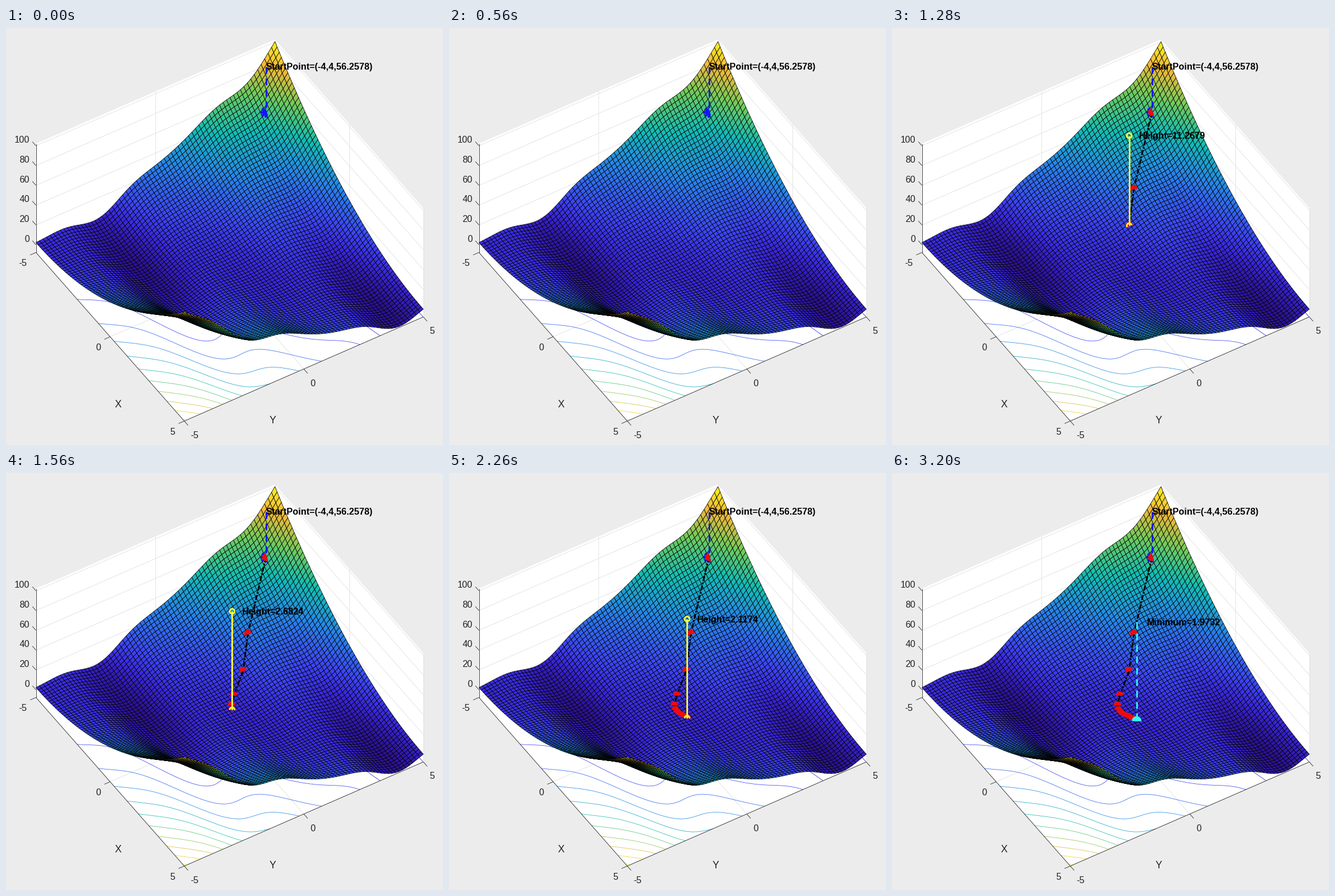
Recreate the animation shown at these times as a matplotlib script. Size 766 px wide and 731 px high, loop 3540 ms.

```python
import numpy as np
import matplotlib.pyplot as plt
from matplotlib.animation import FuncAnimation
from matplotlib.collections import PolyCollection
from matplotlib.colors import LinearSegmentedColormap, to_rgb

W, H, DPI = 766, 731, 64
PX = 72 / DPI                 # points per pixel
STEP_MS, LOOP_MS = 20, 3540
DESCENT_MS, FINISH_MS = 980, 3200
RATE, LAST = 0.1, 16          # gradient descent step and last iteration
ZS = 1.735                    # pixels per unit of z
UX, UY, VX, VY = 26.0, 41.9, 29.55, -18.25
SPAN = (-5, 5)

plt.rcParams.update({"font.family": "Liberation Sans", "lines.scale_dashes": False})
PARULA = LinearSegmentedColormap.from_list("parula", [
    (0, (.170, .070, .580)), (1 / 12, (.225, .150, .860)), (1 / 6, (.235, .270, .970)),
    (1 / 3, (.150, .530, .910)), (1 / 2, (.070, .740, .710)), (2 / 3, (.440, .800, .360)),
    (5 / 6, (.960, .720, .220)), (.92, (.962, .860, .160)), (1, (.977, .984, .081))])


def height(x, y):
    s, c = np.sin(y), np.cos(y)
    return s * np.exp(1 - c) + c * np.exp(1 - s) + (x - y) ** 2


def gradient(x, y):
    s, c = np.sin(y), np.cos(y)
    wave = (c + s * s) * np.exp(1 - c) - (s + c * c) * np.exp(1 - s)
    return np.array([2 * (x - y), -2 * (x - y) + wave])


grid = np.linspace(*SPAN, 70)
GX, GY = np.meshgrid(grid, grid)
GZ = height(GX, GY)
ZMIN, ZMAX = GZ.min(), GZ.max()


def project(x, y, z):
    u = 52.5 + UX * (x + 5) + UY * (y + 5)
    v = 393.5 + VX * (x + 5) + VY * (y + 5) - ZS * (z - ZMIN)
    return u, v


def descend(start):
    points = [np.array(start, float)]
    for _ in range(LAST):
        points.append(points[-1] - RATE * gradient(*points[-1]))
    return [(x, y, height(x, y)) for x, y in points]


fig = plt.figure(figsize=(W / DPI, H / DPI), dpi=DPI, facecolor="#ececec")
ax = fig.add_axes([0, 0, 1, 1])


def reset_axes():
    ax.clear()
    ax.axis("off")
    ax.set(xlim=(0, W), ylim=(H, 0))
    ax.set_autoscale_on(False)


def segment(p, q, color="k", width=0.8, **style):
    (u0, v0), (u1, v1) = project(*p), project(*q)
    return ax.plot([u0, u1], [v0, v1], color=color, lw=width * PX,
                   solid_capstyle="butt", dash_capstyle="butt", **style)[0]


def label(u, v, text, size=16, ha="left", weight="normal", **style):
    return ax.text(u, v + 0.36 * size, text, fontsize=size * PX, ha=ha,
                   va="baseline", weight=weight, **style)


def star(u, v, radius, width):
    inside = np.zeros(u.shape, bool)
    for a in np.arange(4) * np.pi / 4:
        along = abs(u * np.cos(a) + v * np.sin(a))
        across = abs(v * np.cos(a) - u * np.sin(a))
        inside |= (along <= radius) & (across <= width / 2)
    return inside


def ring(u, v, radius, width):
    return abs(np.hypot(u, v) - radius) <= width / 2


def disc(u, v, radius, width):
    return np.hypot(u, v) <= radius


def above_surface(p, u, v, bias=0.4):
    """Whether a screen-facing plane through p lies in front of the surface."""
    df, dh = (v + bias) / 2, (bias - v) / 2
    det = UX * VY - UY * VX
    dx = (u * VY - UY * df) / det
    dy = (UX * df - VX * u) / det
    return p[2] + dh / ZS >= height(p[0] + dx, p[1] + dy)


def marker(p, color, shape, radius, width=0, zorder=20, visible=False):
    n, sub = 26, 6
    u0, v0 = project(*p)
    left, top = int(u0) - n // 2, int(v0) - n // 2
    offsets = (np.arange(n * sub) + 0.5) / sub
    u, v = np.meshgrid(left + offsets - u0, top + offsets - v0)
    mask = shape(u, v, radius, width) & above_surface(p, u, v)
    rgba = np.empty((n, n, 4))
    rgba[..., :3] = to_rgb(color)
    rgba[..., 3] = mask.reshape(n, sub, n, sub).mean(axis=(1, 3))
    return ax.imshow(rgba, extent=(left, left + n, top + n, top), aspect="auto",
                     interpolation="nearest", zorder=zorder, visible=visible)


def draw_box():
    outline = [(-5, -5, ZMIN), (5, -5, ZMIN), (5, 5, ZMIN),
               (5, 5, ZMAX), (-5, 5, ZMAX), (-5, -5, ZMAX)]
    ax.fill(*zip(*[project(*p) for p in outline]), color="w", lw=0, zorder=0)
    faint = dict(color="#dfdfdf", zorder=1)
    for z in range(0, 101, 20):
        segment((-5, -5, z), (-5, 5, z), **faint)
        segment((-5, 5, z), (5, 5, z), **faint)
    for k in (-5, 0, 5):
        segment((-5, k, ZMIN), (-5, k, ZMAX), **faint)
        segment((k, 5, ZMIN), (k, 5, ZMAX), **faint)
        segment((k, -5, ZMIN), (k, 5, ZMIN), **faint)
        segment((-5, k, ZMIN), (5, k, ZMIN), **faint)


def draw_axes():
    ink = dict(color="#222222", zorder=5)
    corner = (5, -5, ZMIN)
    segment((-5, -5, ZMIN), corner, **ink)
    segment(corner, (5, 5, ZMIN), **ink)
    segment((-5, -5, ZMIN), (-5, -5, ZMAX), **ink)
    text = dict(color="#222222")
    for k in (-5, 0, 5):
        u, v = project(k, -5, ZMIN)
        segment((k, -5, ZMIN), (k, -5.24, ZMIN), **ink)
        label(u - 16, v + 18, str(k), ha="right", **text)
        u, v = project(5, k, ZMIN)
        segment((5, k, ZMIN), (5.26, k, ZMIN), **ink)
        label(u + 11, v + 24, str(k), **text)
    for z in range(0, 101, 20):
        u, v = project(-5, -5, z)
        segment((-5, -5, z), (-5.24, -5, z), **ink)
        label(41, v - 11, str(z), ha="right", **text)
    label(196, 658.5, "X", 17.6, "center", **text)
    label(468, 686.5, "Y", 17.6, "center", **text)


def draw_surface():
    floor_u, floor_v = project(GX, GY, ZMIN)
    ax.contour(floor_u, floor_v, GZ, levels=np.arange(0, 101, 10), cmap=PARULA,
               vmin=ZMIN, vmax=ZMAX, linewidths=0.75 * PX, zorder=3)
    corners = np.stack(project(GX, GY, GZ), axis=-1)
    quads = np.stack([corners[:-1, :-1], corners[1:, :-1],
                      corners[1:, 1:], corners[:-1, 1:]], axis=2).reshape(-1, 4, 2)
    level = (GZ[:-1, :-1] + GZ[1:, :-1] + GZ[1:, 1:] + GZ[:-1, 1:]).ravel() / 4
    nearness = (VX * GX + VY * GY)[:-1, :-1].ravel()
    order = np.argsort(nearness, kind="stable")
    colors = PARULA((level - ZMIN) / (ZMAX - ZMIN))
    ax.add_collection(PolyCollection(quads[order], facecolors=colors[order],
                                     edgecolors="k", linewidths=0.75 * PX, zorder=6),
                      autolim=False)


def tip(p):
    return p[0], p[1], ZMAX


points = descend((-4, 4))
start = points[0]
DASH = (0, (12 * PX, 8 * PX))

# The still scene is drawn once and reused as a backdrop.
reset_axes()
draw_box()
draw_surface()
draw_axes()
segment(tip(start), start, "#1414f5", 2.8, ls=DASH, zorder=8)
marker(start, "#1414ff", star, 9.5, 4.5, zorder=9, visible=True)
ax.set(xlim=(0, W), ylim=(H, 0))
fig.canvas.draw()
scene = np.asarray(fig.canvas.buffer_rgba()).copy()

reset_axes()
ax.imshow(scene, extent=(0, W, H, 0), aspect="auto", interpolation="nearest", zorder=0)
u, v = project(*tip(start))
label(u - 0.5, v - 0.5, "StartPoint=(-4,4,56.2578)", weight="bold", zorder=30)

track = np.array([project(*p) for p in points])
path, = ax.plot([], [], color="k", lw=2.8 * PX, zorder=10, dash_capstyle="butt",
                ls=(0, (9 * PX, 2.5 * PX, 3 * PX, 2.5 * PX)))
visited = [marker(p, "#f00a0a", star, 6.5, 5, zorder=12) for p in points]
stems = [segment(p, tip(p), "#ffff2e", 2.8, zorder=20) for p in points]
feet = [marker(p, "#ffff2e", ring, 4.2, 2.8, zorder=21) for p in points]
heads = [marker(tip(p), "#ffff2e", ring, 4.2, 2.8, zorder=21) for p in points]
goal = [segment(tip(points[-1]), points[-1], "#35f4f7", 2.8, ls=DASH, zorder=20),
        marker(points[-1], "#35f4f7", disc, 8.5, zorder=21)]
caption = label(0, 0, "", weight="bold", zorder=30)
ax.set(xlim=(0, W), ylim=(H, 0))


def iteration(ms):
    if ms < DESCENT_MS:
        return -1
    cycle, rest = divmod(ms - DESCENT_MS - STEP_MS, 140)
    shown = 1 + 3 * cycle + max(0, (rest - 80) // 20)
    return int(np.clip(0.424 * shown - 0.3, 0, LAST))


def update(frame):
    ms = frame * STEP_MS
    k = iteration(ms)
    done = ms >= FINISH_MS
    path.set_data(track[:k + 1, 0], track[:k + 1, 1])
    for i in range(LAST + 1):
        visited[i].set_visible(i <= k)
        for part in (stems[i], feet[i], heads[i]):
            part.set_visible(i == k and not done)
    for part in goal:
        part.set_visible(done)
    caption.set_visible(k >= 0)
    if k >= 0:
        u, v = project(*tip(points[k]))
        caption.set_position((u + 17.5, v + 5.8))
        caption.set_text(f"{'Minimum' if done else 'Height'}={points[k][2]:.4f}")
    return [path, caption, *visited, *stems, *feet, *heads, *goal]


anim = FuncAnimation(fig, update, frames=LOOP_MS // STEP_MS, interval=STEP_MS,
                     repeat=True, repeat_delay=0, blit=False)
plt.show()
```
